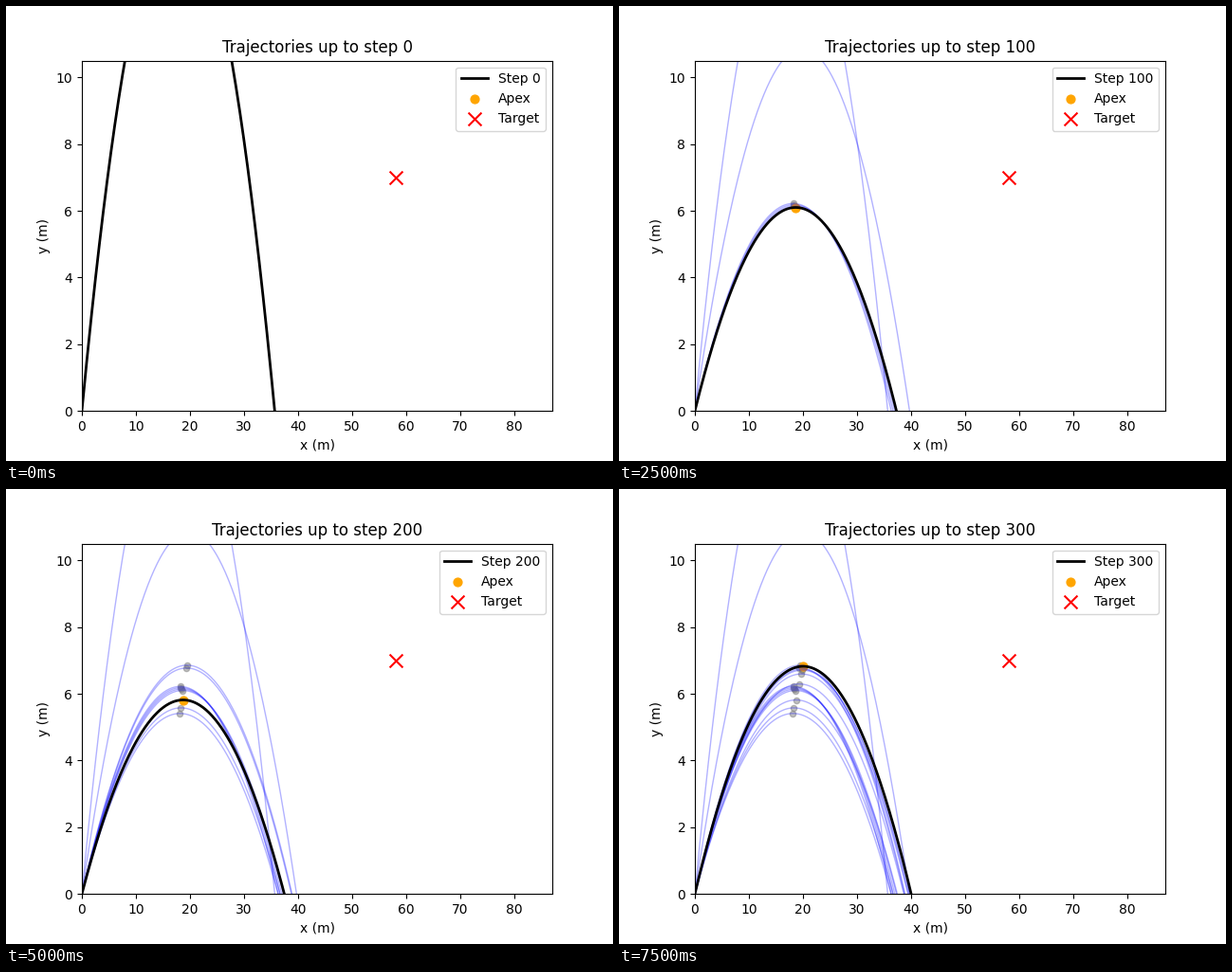
A matplotlib script that plays this animation: 640 by 480 pixels, repeating every 8000 ms.

```python
import numpy as np
import matplotlib.pyplot as plt
from matplotlib.animation import FuncAnimation

G = 9.81
FRAMES = 16
STRIDE = 20
TARGET = (58, 7)

# learned policy: (step, launch angle in degrees) and (step, speed in m/s)
ANGLE_KEYS = [(0, 59.5), (20, 47.6), (40, 34.4), (100, 33.2), (120, 35.2),
              (140, 34.95), (160, 30.8), (200, 31.85), (240, 34.3),
              (260, 33.8), (300, 34.3)]
SPEED_KEYS = [(0, 20.0), (40, 19.55), (120, 20.12), (180, 20.12),
              (220, 20.36), (300, 20.53)]

fig, ax = plt.subplots(figsize=(6.4, 4.8), dpi=100)


def launch(step):
    """Velocity components at a training step."""
    angle = np.radians(np.interp(step, *zip(*ANGLE_KEYS)))
    speed = np.interp(step, *zip(*SPEED_KEYS))
    return speed * np.cos(angle), speed * np.sin(angle)


def flight(step):
    vx, vy = launch(step)
    t = np.linspace(0, 2 * vy / G, 200)
    return vx * t, vy * t - G * t**2 / 2


def apex(step):
    vx, vy = launch(step)
    return vx * vy / G, vy**2 / (2 * G)


def draw(i):
    ax.clear()
    step = i * STRIDE
    for past in range(0, step, STRIDE):
        ax.plot(*flight(past), color="blue", lw=1, alpha=0.3)
        ax.scatter(*apex(past), color="gray", s=20, alpha=0.5)

    ax.plot(*flight(step), color="black", lw=2, label=f"Step {step}")
    ax.scatter(*apex(step), color="orange", s=40, label="Apex")
    ax.scatter(*TARGET, color="red", marker="x", s=100, label="Target")

    ax.set_xlim(0, TARGET[0] * 1.5)
    ax.set_ylim(0, TARGET[1] * 1.5)
    ax.set_xlabel("x (m)")
    ax.set_ylabel("y (m)")
    ax.set_title(f"Trajectories up to step {step}")
    ax.legend(loc="upper right")


anim = FuncAnimation(fig, draw, frames=FRAMES, interval=500,
                     repeat=True, repeat_delay=0)
plt.show()
```
